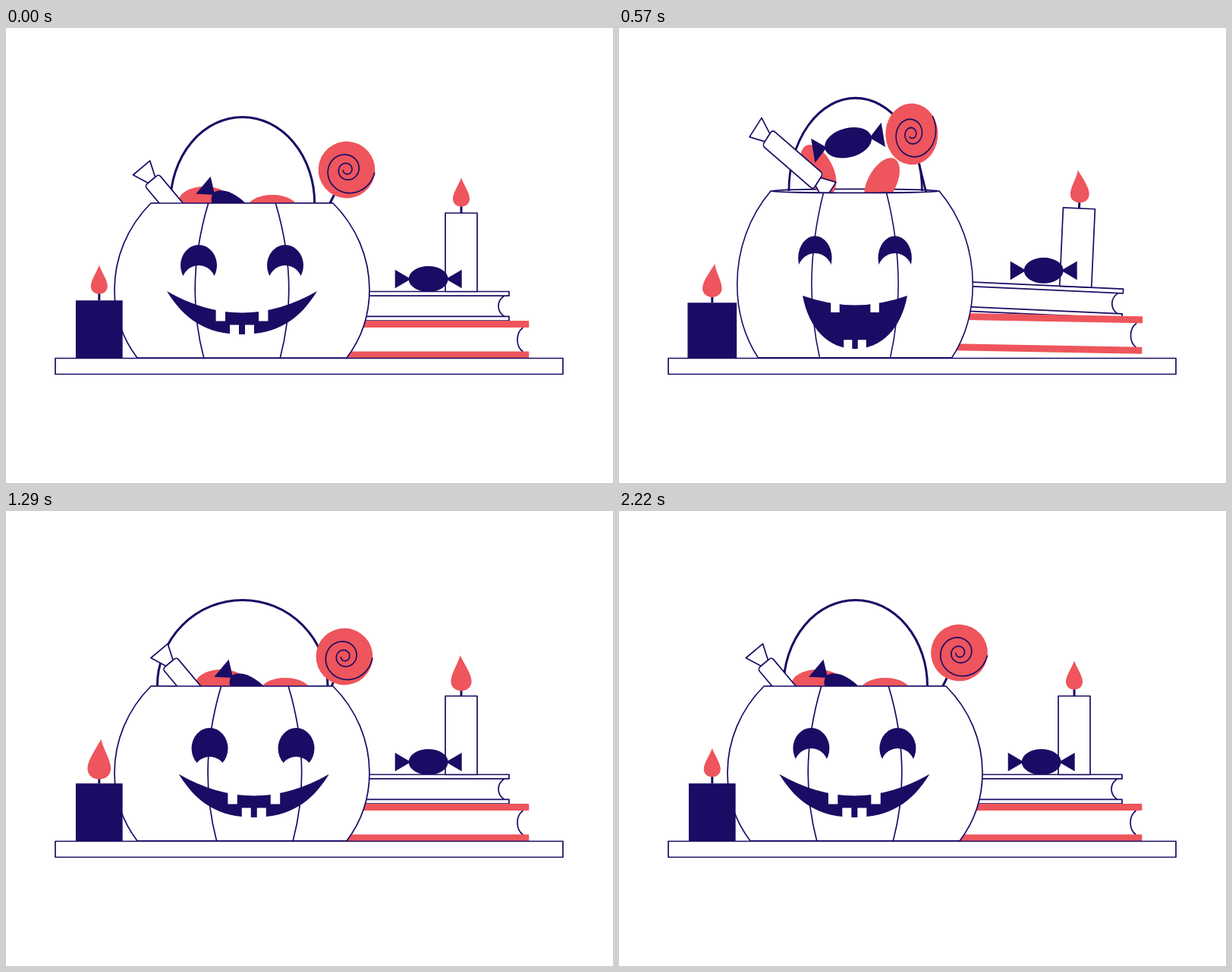
These frames come from a looping animation (800x600 px, 2.25 s). An HTML page with a canvas:

```html
<!DOCTYPE html>
<html lang="en">
<head>
<meta charset="utf-8">
<title>Pumpkin basket</title>
<style>
  html, body { margin: 0; width: 100%; height: 100%; overflow: hidden; background: #fff; }
  canvas { display: block; width: 800px; height: 600px; }
</style>
</head>
<body>
<canvas id="stage" width="800" height="600"></canvas>
<script>
const ctx = document.getElementById('stage').getContext('2d');
const NAVY = '#1a0c64', RED = '#ee555c', WHITE = '#fff';
const LOOP = 2250, TAU = Math.PI * 2, RAD = Math.PI / 180;
const LINE = 1.7, MID = 311, FLOOR = 435, RIM = 231;

// Key times shared by every track; each track returns to its first value
const TIMES = [72, 270, 570, 990, 1290, 1890, 2250];
const FLAMES = {
  left: { size: [38, 38, 44, 54, 53, 42], sway: [0, 6.5, 3.5, -7.5, 2.5, 0] },
  right: { size: [38, 38, 43, 47, 47, 40], sway: [0, -5.5, -4, 6, -1.5, 0] }
};
const SWEETS = {
  lolly: { x: [449, 430, 392, 412, 446, 422], y: [187, 175, 161.5, 174, 192, 185.5], a: [26.5, 18.7, -16, 5.6, 23.5, 13.6] },
  bar: { x: [221, 222, 222.2, 220.3, 244.5, 211.7], y: [235, 203, 192.7, 224, 235, 235], a: [50, 71, 36.6, 55, 50, 50] },
  toffee: { x: [299, 301.3, 301.3, 300.7, 323, 291.5], y: [240, 202.7, 172, 238.4, 240, 240], a: [40, 24, -11, 38, 40, 40] },
  gumA: { x: [262, 262, 259, 260, 284, 252], y: [228.5, 205, 205, 237, 228.5, 228.5], a: [0, -45, -125, -135, -180, -180, -180] },
  gumB: { x: [351, 351, 349.4, 350.5, 368, 341], y: [239.5, 231.5, 221, 220.5, 239.5, 239.5], a: [0, 5, -55, 0, 0, 0] }
};
const STACK = {
  redTilt: [0, 0, 1.05, -0.8, 0, 0],
  whiteTilt: [0, 0, 2.6, -1.9, 0, 0],
  whiteLift: [0, 0.5, 0, 11, 0, 0],
  toffeeX: [0, 0, 3, -2.5, 0, 0],
  toffeeLift: [0, 1, 3.5, 27.5, 0, 0],
  toffeeTilt: [0, 0, 0, -13, 0, 0]
};

const lerp = (a, b, u) => a + (b - a) * u;
function ease(t, from, to) {
  const u = Math.min(1, Math.max(0, (t - from) / (to - from)));
  return u * u * (3 - 2 * u);
}

// Smooth interpolation that never overshoots its keys
function track(values, t) {
  const v = i => values[i] ?? values[0];
  if (t <= TIMES[0]) return v(0);
  const last = TIMES.length - 1;
  let i = 0;
  while (i < last - 1 && t > TIMES[i + 1]) i++;
  const step = k => (v(k + 1) - v(k)) / (TIMES[k + 1] - TIMES[k]);
  const slope = k => {
    if (k === 0 || k === last) return 0;
    const a = step(k - 1), b = step(k);
    return a * b <= 0 ? 0 : 2 * a * b / (a + b);
  };
  const d = TIMES[i + 1] - TIMES[i], u = (t - TIMES[i]) / d, w = 1 - u;
  return v(i) * (1 + 2 * u) * w * w + slope(i) * d * u * w * w
    + v(i + 1) * u * u * (3 - 2 * u) - slope(i + 1) * d * u * u * w;
}

// Sideways shift of the pumpkin's surface as it turns
function turn(t) {
  if (t < 1350) return 17 * ease(t, 870, 1350);
  if (t < 1830) return lerp(17, -18.5, ease(t, 1350, 1830));
  return lerp(-18.5, 0, ease(t, 1830, LOOP));
}

function at(x, y, deg, draw) {
  ctx.save();
  ctx.translate(x, y);
  ctx.rotate(deg * RAD);
  draw();
  ctx.restore();
}
function paint(fill, stroke, width = LINE) {
  if (fill) { ctx.fillStyle = fill; ctx.fill(); }
  if (stroke) { ctx.strokeStyle = stroke; ctx.lineWidth = width; ctx.stroke(); }
}
function box(x, y, w, h, fill, stroke) {
  ctx.beginPath();
  ctx.rect(x, y, w, h);
  paint(fill, stroke);
}
function oval(x, y, rx, ry, fill) {
  ctx.beginPath();
  ctx.ellipse(x, y, rx, ry, 0, 0, TAU);
  paint(fill);
}
function poly(points, fill, stroke) {
  ctx.beginPath();
  points.forEach(([x, y]) => ctx.lineTo(x, y));
  ctx.closePath();
  paint(fill, stroke);
}

function flame(x, top, { size, sway }, t) {
  const h = track(size, t), tip = track(sway, t), w = h * 0.29;
  const neck = tip * 0.25;
  box(x - 1.5, top - 11, 3, 11, NAVY);
  ctx.save();
  ctx.translate(x, top - 8.5 + (h - 38) * 0.2);
  ctx.beginPath();
  ctx.moveTo(tip, -h);
  ctx.bezierCurveTo(neck + h * 0.08, -h * 0.77, w, -h * 0.48, w, -h * 0.27);
  ctx.bezierCurveTo(w, -h * 0.1, h * 0.16, 0, 0, 0);
  ctx.bezierCurveTo(-h * 0.16, 0, -w, -h * 0.1, -w, -h * 0.27);
  ctx.bezierCurveTo(-w, -h * 0.48, neck - h * 0.08, -h * 0.77, tip, -h);
  paint(RED);
  ctx.restore();
}

function toffee(rx, ry, reach, wing) {
  oval(0, 0, rx, ry, NAVY);
  for (const s of [-1, 1]) poly([[s * (rx - 3), 0], [s * reach, -wing], [s * reach, wing]], NAVY);
}

function bar() {
  for (const s of [-1, 1]) {
    poly([[s * 45, -6], [s * 66, -14.5], [s * 66, 14.5], [s * 45, 6]], WHITE, NAVY);
  }
  ctx.beginPath();
  ctx.roundRect(-45, -12, 90, 24, 4);
  paint(WHITE, NAVY);
}

function lolly() {
  box(-1.5, 0, 3, 90, NAVY);
  oval(0, 0, 37.4, 37.4, RED);
  ctx.beginPath();
  for (let n = 0; n <= 10; n += 0.05) {
    const r = 37 * 0.81 ** n, a = -21 * RAD + n * Math.PI / 2;
    ctx.lineTo(r * Math.cos(a), r * Math.sin(a));
  }
  paint(null, NAVY);
}

function pages(x, top, bottom) {
  ctx.beginPath();
  ctx.moveTo(x, top);
  ctx.bezierCurveTo(x - 10, top + 7, x - 10, bottom - 7, x, bottom);
  paint(null, NAVY);
}

function books(t) {
  const hop = t > 159 && t < 1059 ? 4.5 * (1 - Math.cos(TAU * (t - 159) / 300)) : 0;
  const s = name => track(STACK[name], t);
  at(570, 386 - hop - s('whiteLift'), s('whiteTilt'), () => {
    box(-170, -38, 256, 38, WHITE);
    pages(86.5, -32.7, -5.7);
    for (const y of [-38.5, -5.7]) box(-170, y, 263, 5.7, WHITE, NAVY);
    box(9, -142, 42, 103.5, WHITE, NAVY);
    flame(30, -142, FLAMES.right, t);
  });
  at(580, FLOOR - hop, s('redTilt'), () => {
    box(-180, -48, 288, 48, WHITE);
    pages(101.5, -40, -8);
    for (const y of [-49, -8.5]) {
      ctx.beginPath();
      ctx.roundRect(-180, y, 289.3, 9, 1);
      paint(RED);
    }
  });
  at(556.7 + s('toffeeX'), 331 - hop - s('toffeeLift'), s('toffeeTilt'), () => toffee(26, 17, 44, 12.3));
}

function bodyPath(open) {
  ctx.beginPath();
  ctx.moveTo(MID - 120, RIM);
  ctx.bezierCurveTo(160, 262, 143, 303, 143, 345);
  ctx.bezierCurveTo(143, 380, 154, 410, 173, FLOOR);
  ctx.lineTo(449, FLOOR);
  ctx.bezierCurveTo(468, 410, 479, 380, 479, 345);
  ctx.bezierCurveTo(479, 303, 462, 262, MID + 120, RIM);
  ctx.ellipse(MID, RIM, 120, open, 0, 0, Math.PI);
  ctx.closePath();
}

function eye(x, cut, grin) {
  const r = lerp(22, 26, grin);
  ctx.save();
  ctx.beginPath();
  ctx.rect(x - 40, 270, 80, 100);
  ctx.ellipse(x, cut + r, r, r, 0, 0, TAU);
  ctx.clip('evenodd');
  ctx.beginPath();
  ctx.rect(x - 40, 270, 80, cut + r - 270);
  ctx.clip();
  oval(x, 313, 24, 27, NAVY);
  ctx.restore();
}

function mouth(x, open) {
  const mix = (a, b) => lerp(a, b, open);
  const w = mix(99, 74.6), y = mix(347, 359), low = mix(404, 424);
  const k1 = mix(76, 66), ky = mix(385, 399), k2 = mix(46, 38);
  ctx.beginPath();
  ctx.moveTo(x - w, y);
  ctx.quadraticCurveTo(x, 2 * mix(375.5, 370.5) - y, x + w, y);
  ctx.bezierCurveTo(x + k1, ky, x + k2, low, x, low);
  ctx.bezierCurveTo(x - k2, low, x - k1, ky, x - w, y);
  paint(NAVY);
  const upper = mix(386.5, 379.5), lower = mix(391.5, 413);
  for (const s of [-1, 1]) {
    box(x + s * 28.2 - 6.2, upper - 18, 12.4, 18, WHITE);
    box(x + s * 10 - 6, lower, 12, 14, WHITE);
  }
}

function pumpkin(t, bounce) {
  const open = t > 234 && t < 1134 ? 8.2 * (1 - Math.cos(TAU * (t - 234) / 300)) : 0;
  const spin = turn(t), ridges = turn(t + 35), face = turn(t - 20);
  const grin = ease(t, 72, 250) * (1 - ease(t, 780, 1160));
  const cut = t < 500 ? lerp(313, 307, grin)
    : lerp(324 - 17 * grin, 313, ease(t, 1930, 2190));

  ctx.save();
  ctx.translate(MID, FLOOR);
  ctx.scale(1 - 0.1 * bounce, 1 + 0.104 * bounce);
  ctx.translate(-MID, -FLOOR);

  ctx.beginPath();
  ctx.ellipse(MID, RIM, 119.5, open, 0, Math.PI, TAU);
  paint(WHITE, NAVY);
  ctx.beginPath();
  ctx.ellipse(MID + 0.7, RIM, 95 + 0.932 * spin + 0.0081 * spin * spin, 113.5, 0, Math.PI, TAU);
  paint(null, NAVY, 3);

  const put = (name, draw) => {
    const { x, y, a } = SWEETS[name];
    at(track(x, t), track(y, t), track(a, t), draw);
  };
  const gum = () => oval(0, 0, 34.5, 19.5, RED);
  put('gumA', gum);
  put('gumB', gum);
  put('toffee', () => toffee(34, 18, 51, 15));
  put('bar', bar);
  put('lolly', lolly);

  bodyPath(open);
  paint(WHITE);
  ctx.save();
  ctx.clip();
  for (const s of [-1, 1]) {
    const x = MID + ridges;
    ctx.beginPath();
    ctx.moveTo(x + s * 44.3, RIM);
    ctx.quadraticCurveTo(x + s * 76, 337, x + s * 50.3, FLOOR);
    paint(null, NAVY);
    eye(MID + s * 57 + face * 0.92, cut, grin);
  }
  mouth(MID + face, grin);
  ctx.restore();
  bodyPath(open);
  paint(null, NAVY);
  ctx.restore();
}

function candle(t, bounce) {
  const w = 61.7 * (1 + 0.065 * bounce), h = 75.7 * (1 - 0.052 * bounce);
  box(122.8 - w / 2, FLOOR - h, w, h, NAVY);
  flame(122.8, FLOOR - h, FLAMES.left, t);
}

function draw(t) {
  const bounce = t > 72 && t < 1272 ? 0.5 - 0.5 * Math.cos(TAU * (t - 72) / 300) : 0;
  ctx.fillStyle = WHITE;
  ctx.fillRect(0, 0, 800, 600);
  ctx.lineJoin = 'round';
  books(t);
  pumpkin(t, bounce);
  candle(t, bounce);
  box(65, 435.5, 669, 21, WHITE, NAVY);
}

const start = performance.now();
function tick() {
  draw((performance.now() - start) % LOOP);
  requestAnimationFrame(tick);
}
tick();
</script>
</body>
</html>
```
